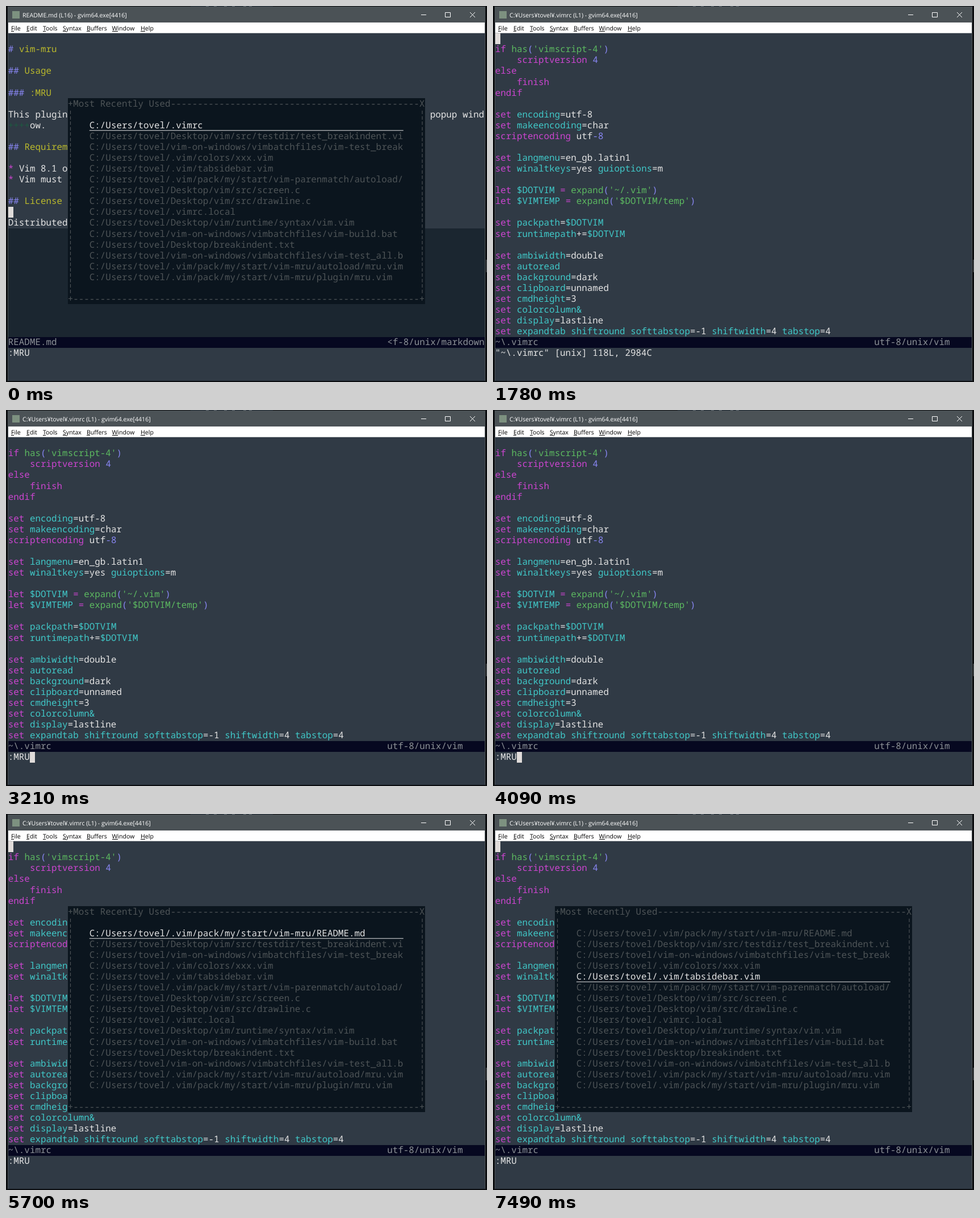
These frames come from a looping animation (847 px wide and 661 px high, 8000 ms). An HTML page:

```html
<!DOCTYPE html>
<html lang="en">
<head>
<meta charset="utf-8">
<title>vim-mru</title>
<style>
  html, body { margin: 0; width: 100%; height: 100%; overflow: hidden; background: #0b0d10; }
  svg { display: block; width: 847px; height: 661px; }
  text { white-space: pre; text-rendering: geometricPrecision; }
  .mono { font: 15.889px "Noto Sans Mono", "DejaVu Sans Mono", monospace; }
  .ui { font: 10.6px "Open Sans", "Noto Sans", sans-serif; }
</style>
</head>
<body>
<svg viewBox="0 0 847 661" xmlns="http://www.w3.org/2000/svg">
  <g id="chrome"></g>
  <g id="screen"></g>
</svg>
<script>
const LOOP = 8000, X0 = 3.81, Y0 = 47.67, CW = 9.5333, RH = 19.07, BASE = 14.6;
const USER = 'tovel';
const INK = {
  w: '#e4e4e4', m: '#cb45cf', c: '#40c8c8', g: '#5cb860', b: '#8886f2',
  y: '#b9b82c', s: '#8c9196', d: '#4e5457', k: '#1d5a40'
};

// "^x" switches to ink x
const README = [
  '', '^b# ^yvim-mru', '', '^b## ^yUsage', '', '^b### ^y:MRU', '',
  '^wThis plugin' + ' '.repeat(67) + 'popup wind', '^k++++^wow.', '',
  '^b## ^yRequirem', '', '^m* ^wVim 8.1 o', '^m* ^wVim must', '',
  '^b## ^yLicense', '', '^wDistributed'
];
const set = (...opts) => '^mset' + opts.map(o => ' ^c' + o.replace(/(\+?=)/, '^w$1')).join('');
const VIMRC = [
  '', "^mif ^ghas^b(^g'vimscript-4'^b)", '^m    scriptversion ^b4', '^melse',
  '^m    finish', '^mendif', '',
  set('encoding=utf-8'), set('makeencoding=char'), '^mscriptencoding ^wutf^b-8', '',
  set('langmenu=en_gb.latin1'), set('winaltkeys=yes', 'guioptions=m'), '',
  "^mlet ^c$DOTVIM ^m= ^gexpand^b(^g'~/.vim'^b)",
  "^mlet ^c$VIMTEMP ^m= ^gexpand^b(^g'$DOTVIM/temp'^b)", '',
  set('packpath=^c$DOTVIM'), set('runtimepath+=^c$DOTVIM'), '',
  set('ambiwidth=double'), set('autoread'), set('background=dark'),
  set('clipboard=unnamed'), set('cmdheight=3'), set('colorcolumn&'),
  set('display=lastline'),
  set('expandtab', 'shiftround', 'softtabstop=-1', 'shiftwidth=4', 'tabstop=4')
];
const DOCS = {
  readme: {
    lines: README, title: 'README.md (L16) - gvim64.exe[4416]',
    name: 'README.md', type: '<f-8/unix/markdown', first: '.vimrc'
  },
  vimrc: {
    lines: VIMRC, title: `C:¥Users¥${USER}¥.vimrc (L1) - gvim64.exe[4416]`,
    name: '~\\.vimrc', type: 'utf-8/unix/vim', first: '.vim/pack/my/start/vim-mru/README.md'
  }
};
const RECENT = [
  'Desktop/vim/src/testdir/test_breakindent.vi',
  'vim-on-windows/vimbatchfiles/vim-test_break',
  '.vim/colors/xxx.vim',
  '.vim/tabsidebar.vim',
  '.vim/pack/my/start/vim-parenmatch/autoload/',
  'Desktop/vim/src/screen.c',
  'Desktop/vim/src/drawline.c',
  '.vimrc.local',
  'Desktop/vim/runtime/syntax/vim.vim',
  'vim-on-windows/vimbatchfiles/vim-build.bat',
  'Desktop/breakindent.txt',
  'vim-on-windows/vimbatchfiles/vim-test_all.b',
  '.vim/pack/my/start/vim-mru/autoload/mru.vim',
  '.vim/pack/my/start/vim-mru/plugin/mru.vim'
];

// Each step changes part of the editor state; cur is [column, row], sel -1 hides the popup
const STEPS = [
  [0, { doc: 'readme', cmd: ':MRU', cur: [0, 16], on: true, sel: 0 }],
  [620, { on: false }], [870, { on: true }],
  [1260, { on: false }], [1510, { on: true }],
  [1780, { doc: 'vimrc', cmd: '"~\\.vimrc" [unix] 118L, 2984C', cur: [0, 0], sel: -1 }],
  [2450, { on: false }],
  [2570, { cmd: ':', cur: [1, 29], on: true }],
  [2840, { cmd: ':M', cur: [2, 29] }],
  [3210, { cmd: ':MRU', cur: [4, 29] }],
  [3840, { on: false }], [4090, { on: true }], [4470, { on: false }],
  [4590, { cmd: ':MRU ', cur: [5, 29], on: true }],
  [5320, { cmd: ':MRU', cur: [4, 29] }],
  [5700, { cur: [0, 0], sel: 0 }],
  [6100, { sel: 1 }], [6350, { sel: 2 }], [6470, { sel: 3 }],
  [6740, { sel: 4 }], [6860, { sel: 5 }],
  [7370, { on: false }], [7490, { sel: 4, on: true }]
];

const esc = s => s.replace(/&/g, '&amp;').replace(/</g, '&lt;');
const colX = c => X0 + c * CW;
const rowY = r => Y0 + r * RH;
const rect = (x, y, w, h, fill) =>
  `<rect x="${x}" y="${y}" width="${w}" height="${h}" fill="${fill}"/>`;
const block = (c, r, w, h, fill) => {
  const x = Math.round(colX(c)), y = Math.round(rowY(r));
  return rect(x, y, Math.round(colX(c + w)) - x, Math.round(rowY(r + h)) - y, fill);
};
const ui = (x, y, s, fill) => `<text class="ui" x="${x}" y="${y}" fill="${fill}">${esc(s)}</text>`;
const mono = (c, r, s, ink) =>
  `<text class="mono" x="${colX(c).toFixed(2)}" y="${(rowY(r) + BASE).toFixed(2)}" fill="${INK[ink]}">${esc(s)}</text>`;

function line(row, src) {
  let col = 0, out = '';
  for (const part of src.split('^').slice(1)) {
    const s = part.slice(1);
    if (s) out += mono(col, row, s, part[0]);
    col += s.length;
  }
  return out;
}

function popup(doc, sel) {
  let out = block(11, 6, 66, 19, '#0b151e');
  out += mono(11, 6, '+Most Recently Used' + '-'.repeat(46) + 'X', 'd');
  out += mono(11, 24, '+' + '-'.repeat(64) + '+', 'd');
  for (let r = 7; r < 24; r++) out += mono(11, r, '¦', 'd') + mono(76, r, '¦', 'd');
  [doc.first, ...RECENT].forEach((path, i) => {
    out += mono(15, 8 + i, `C:/Users/${USER}/${path}`, i === sel ? 'w' : 'd');
  });
  return out + rect(colX(15), rowY(9 + sel) - 1, 58 * CW, 1, INK.w);
}

function screen(s) {
  const doc = DOCS[s.doc];
  let out = ui(29, 19.6, doc.title, '#fff');
  if (doc.lines.length < 28) out += block(0, 18, 88, 10, '#1b2630');
  doc.lines.forEach((src, r) => out += line(r, src));
  out += block(0, 28, 88, 1, '#060820');
  out += mono(0, 28, doc.name, 's') + mono(70, 28, doc.type, 's') + mono(0, 29, s.cmd, 'w');
  if (s.on) out += block(...s.cur, 1, 1, '#e0dcda');
  if (s.sel >= 0) out += popup(doc, s.sel);
  return out;
}

function chrome() {
  let out = rect(0, 0, 847, 661, '#0b0d10') + rect(325, 0, 145, 1, '#18222c');
  for (const x of [352, 366, 384, 398, 418, 428]) out += rect(x, 0, 5, 1, '#59626a');
  out += rect(845, 446, 2, 22, '#3c4043');
  out += rect(3, 1, 841, 658, '#4b5256') + rect(4, Y0, 839, 659 - Y0, '#303a45');
  out += rect(4, 29, 839, Y0 - 29, '#fff') + rect(11, 9, 13, 13, '#7d9180');
  const menus = { File: 9, Edit: 36, Tools: 65, Syntax: 100, Buffers: 142, Window: 186.5, Help: 237 };
  for (const name in menus) {
    const x = menus[name], w = { E: 5, T: 5, W: 10, H: 8, F: 5 }[name[0]] || 6;
    out += ui(x, 42.6, name, '#000') + rect(Math.round(x), 44, w, 1, '#000');
  }
  return out + '<path d="M731 15.5h9M773.5 11.5h9v8h-9zM817 11l9 9M826 11l-9 9" fill="none" stroke="#fff"/>';
}

document.getElementById('chrome').innerHTML = chrome();
const view = document.getElementById('screen');
const start = performance.now();
let shown = -1;

function tick() {
  const t = (performance.now() - start) % LOOP;
  const n = STEPS.filter(([at]) => at <= t).length;
  if (n !== shown) {
    shown = n;
    view.innerHTML = screen(Object.assign({}, ...STEPS.slice(0, n).map(step => step[1])));
  }
  requestAnimationFrame(tick);
}
tick();
</script>
</body>
</html>
```
